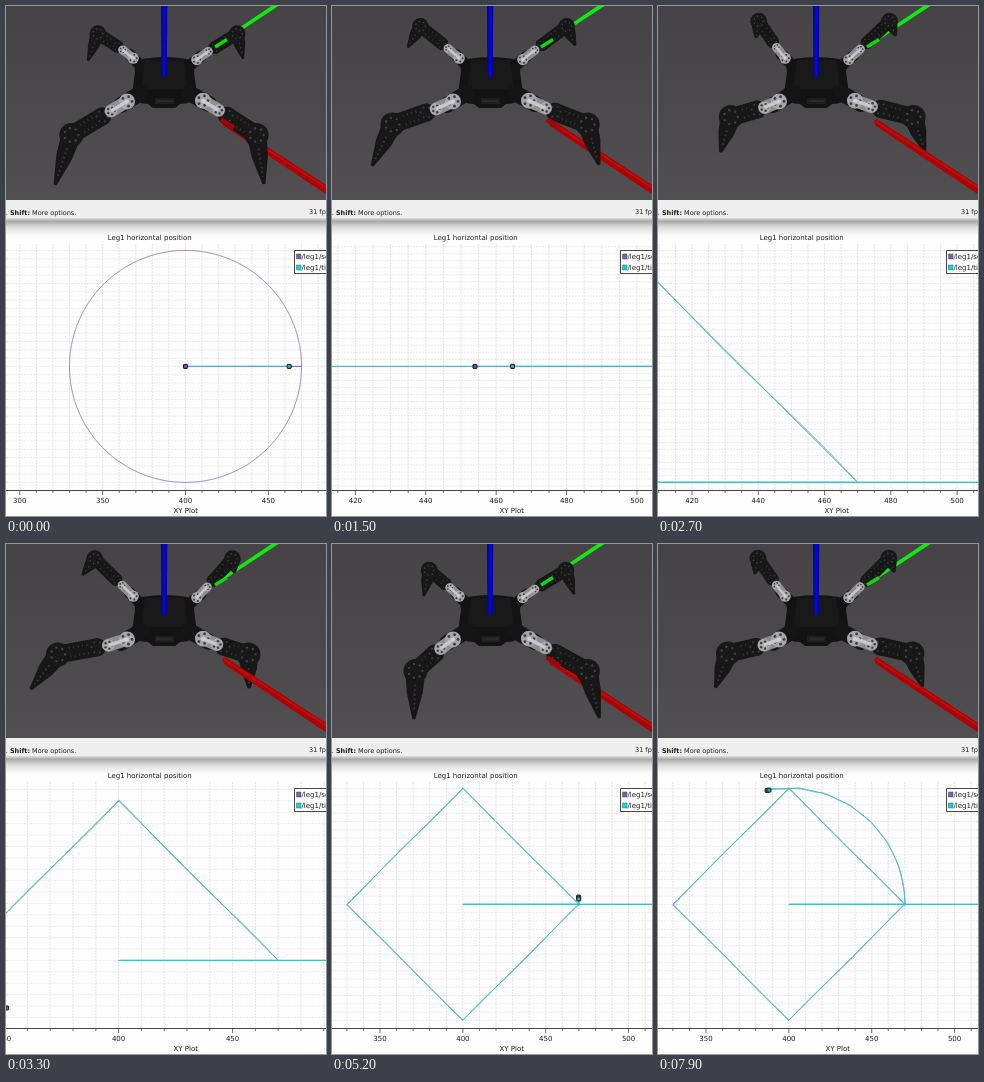
Recreate the animation shown at these times as an HTML page. Size 320 by 510 pixels, loop 8 s.

```html
<!DOCTYPE html>
<html lang="en">
<head>
<meta charset="utf-8">
<title>Leg position plot</title>
<style>
html, body { margin: 0; width: 100%; height: 100%; overflow: hidden; background: #fff; }
svg { display: block; width: 320px; height: 510px; }
text { font: 7px "DejaVu Sans", sans-serif; fill: #1c1c1c; }
.status { font-size: 6.5px; }
.mid { text-anchor: middle; }
</style>
</head>
<body>
<svg viewBox="0 0 320 510">
  <defs>
    <linearGradient id="sky" x2="0" y2="1">
      <stop stop-color="#454345"/><stop offset="1" stop-color="#514f51"/>
    </linearGradient>
    <linearGradient id="edge" x2="0" y2="1">
      <stop stop-color="#e0e0e0"/><stop offset=".18" stop-color="#a8a8a8"/>
      <stop offset=".5" stop-color="#dcdcdc"/><stop offset="1" stop-color="#fdfdfd"/>
    </linearGradient>
    <linearGradient id="rod" x2="1" y2="0">
      <stop stop-color="#0000a0"/><stop offset=".5" stop-color="#0a0ac4"/><stop offset="1" stop-color="#0000a8"/>
    </linearGradient>
    <clipPath id="view"><path d="M0 0H320V194H0Z"/></clipPath>
    <clipPath id="canvas"><path d="M0 238H320V484H0Z"/></clipPath>
  </defs>
  <path d="M0 0H320V510H0Z" fill="#fdfdfd"/>
  <path d="M0 0H320V194H0Z" fill="url(#sky)"/>
  <g id="robot" clip-path="url(#view)"></g>
  <path d="M0 194H320V213H0Z" fill="#eeeeee"/>
  <path d="M0 212H320V230H0Z" fill="url(#edge)"/>
  <text class="status" x="-.2" y="208.5" xml:space="preserve">. <tspan font-weight="bold">Shift:</tspan> More options.</text>
  <text class="status" x="303" y="207.5">31 fps</text>
  <text class="mid" x="143.7" y="233.5">Leg1 horizontal position</text>
  <g id="plot"></g>
  <path d="M288.5 244.5H325V267.5H288.5Z" fill="#fff" stroke="#333" stroke-width=".9"/>
  <path d="M290.5 248H295V253H290.5Z" fill="#7d5fa8" stroke="#444" stroke-width=".5"/>
  <path d="M290.5 259H295V264H290.5Z" fill="#20ced6" stroke="#267" stroke-width=".5"/>
  <text x="295.5" y="253.3">/leg1/setpoint</text>
  <text x="295.5" y="264.2">/leg1/tip</text>
</svg>
<script>
const LOOP = 8, FRAME = 0.1, CLEAR = 0.4, CIRCLE = 5.1;
const PURPLE = '#7350a8', CYAN = '#1fd0d6';
const robot = document.getElementById('robot');
const plot = document.getElementById('plot');

const lerp = (a, b, k) => a + (b - a) * k;
const mix = (p, q, k) => p.map((v, i) => lerp(v, q[i], k));
const clamp = v => Math.min(1, Math.max(0, v));
const fix = v => v.toFixed(2);
const polar = (r, turn) => [r * Math.cos(turn * 2 * Math.PI), r * Math.sin(turn * 2 * Math.PI)];

// Setpoint: circle, sweep out and back, diamond, circle (10 s per turn).
const onCircle = turn => { const [x, y] = polar(70, turn); return [400 + x, y]; };

function onSweep(t) {
  if (t < 0) return [lerp(470, 400, clamp((t + 0.1) / 0.094)), 0];
  if (t < 0.87) return [lerp(400, 528.7, clamp((t - CLEAR) / 0.47)), 0];
  if (t < 1.955) return [lerp(528.7, 400, (t - 0.87) / 1.085), 0];
  return [lerp(400, 470, clamp((t - 1.955) / 0.165)), 0];
}

// The setpoint rests briefly at the first corner.
function onDiamond(t) {
  const sides = t < 2.69 ? clamp((t - 2.14) / 0.46) : Math.min(4, 1 + (t - 2.69) / 0.47);
  const from = Math.floor(sides);
  const [x, y] = mix(polar(70, from / 4), polar(70, (from + 1) / 4), sides - from);
  return [400 + x, y];
}

function setpoint(t) {
  if (t < -0.1) return onCircle((t + 0.1) / 10);
  if (t < 2.14) return onSweep(t);
  return t < CIRCLE ? onDiamond(t) : onCircle((t - CIRCLE) / 10);
}
const tip = t => setpoint(t - (t > CIRCLE ? 0.025 : 0.09));

function trace(fn, from, to) {
  const points = [[400, 0]];
  for (let t = from; t < to; t += 0.01) points.push(fn(t));
  points.push(fn(to));
  return points;
}

function wobblyTip(t) {
  const [x, y] = tip(t);
  return y ? [x, y + 0.45 * Math.sin(t * 17)] : [x, y];
}

function tickSteps(scale) {
  if (scale < 2.5) return [50, 10, 5];
  return scale < 5 ? [20, 5, 2] : [10, 2, 1];
}

function drawPlot(t) {
  const fresh = t >= CLEAR;
  const wanted = trace(setpoint, fresh ? CLEAR : -10.1, t);
  const actual = trace(wobblyTip, fresh ? CLEAR : 0, t);
  const xs = wanted.map(p => p[0]), ys = wanted.map(p => p[1]);
  const left = Math.min(...xs), right = Math.max(...xs);
  const low = Math.min(...ys), high = Math.max(...ys);
  const scale = Math.min(453 / Math.max(right - left, 70), 232 / Math.max(high - low, 1));
  const midX = scale > 2.5 && high > 40 ? 178.5 : 179.5;
  const px = x => midX + (x - (left + right) / 2) * scale;
  const py = y => 360.4 - (y - (low + high) / 2) * scale;

  const [major, minor, rowStep] = tickSteps(scale);
  let cols = '', rows = '', ticks = '', labels = '';
  const firstX = Math.ceil(((left + right) / 2 - 190 / scale) / minor) * minor;
  for (let x = firstX; px(x) < 340; x += minor) {
    const at = fix(px(x)), big = x % major === 0;
    cols += `M${at} 238V484`;
    ticks += `M${at} 484v${big ? 5 : 3}`;
    if (big) labels += `<text class="mid" x="${at}" y="496.6">${x}</text>`;
  }
  const firstY = Math.ceil(((low + high) / 2 - 125 / scale) / rowStep) * rowStep;
  for (let y = firstY; py(y) > 238; y += rowStep) rows += `M0 ${fix(py(y))}H320`;

  const line = (points, color, width) =>
    `<path d="M${points.map(p => fix(px(p[0])) + ' ' + fix(py(p[1]))).join('L')}" fill="none" stroke="${color}" stroke-width="${width}"/>`;
  const marker = ([x, y], color) =>
    `<rect x="${fix(px(x) - 2)}" y="${fix(py(y) - 2)}" width="4" height="4" rx=".6" fill="${color}" stroke="#111"/>`;

  plot.innerHTML = `
    <g clip-path="url(#canvas)">
      <path d="${cols}" stroke="#d6d6d6" stroke-width=".6" stroke-dasharray="2 1"/>
      <path d="${rows}" stroke="#dedede" stroke-width=".6" stroke-dasharray="2 1"/>
      ${line(wanted, PURPLE, 0.7)}${line(actual, CYAN, 0.9)}
      ${marker(setpoint(t), PURPLE)}${marker(tip(t), '#3aa99c')}
    </g>
    <path d="M0 484.5H320" stroke="#333" stroke-width=".9"/>
    <path d="${ticks}" stroke="#444" stroke-width=".8"/>
    ${labels}<text class="mid" x="${midX + 0.2}" y="506.8">XY Plot</text>`;
}

// Home joints on screen; sway is the sideways foot travel per plot unit of x and y.
const legs = [
  { side: -1, size: 0.7, hip: [137, 62], bracket: [123, 48], knee: [93, 20], foot: [84, 41], sway: [0.1, 0.2] },
  { side: 1, size: 0.7, hip: [181, 62], bracket: [195, 50], knee: [230, 20], foot: [235, 39], sway: [0.1, 0.04] },
  { side: -1, size: 1, hip: [135, 87], bracket: [115, 99], knee: [67, 118], foot: [52, 159], sway: [0.42, 0.15] },
  { side: 1, size: 1, hip: [183, 87], bracket: [203, 98], knee: [249, 118], foot: [255, 158], sway: [0.17, 0.17] }
];

// All legs move outward together during the sweep, then follow the tip in the plane.
function poseLeg({ side, size, knee, foot, sway }, t) {
  const reach = clamp((t - CLEAR) / 0.55);
  const [x, y] = t < 2.1 ? [470, 0] : tip(t);
  const out = [side * lerp(3, 12, reach) * size, lerp(20, 1, reach) * size];
  const follow = [sway[0] * (x - 400) + sway[1] * y, (0.24 * (x - 400) - 0.18 * y) * size];
  const move = mix(out, follow, clamp((t - 1.6) / 0.6));
  const shifted = (p, k) => [p[0] + move[0] * k, p[1] + move[1] * k];
  return { knee: shifted(knee, 0.55), foot: shifted(foot, 1) };
}

const disc = ([x, y], r, fill) => `<circle cx="${fix(x)}" cy="${fix(y)}" r="${fix(r)}" fill="${fill}"/>`;
const bar = (a, b, width, color, extra = '') =>
  `<path d="M${a.map(fix)}L${b.map(fix)}" stroke="${color}" stroke-width="${fix(width)}" ${extra}/>`;
const shape = (points, fill) => `<path d="M${points.map(p => p.map(fix)).join('L')}Z" fill="${fill}"/>`;
const ring = ([x, y], r, n, dot, fill) => Array.from({ length: n }, (_, i) => {
  const [dx, dy] = polar(r, i / n);
  return disc([x + dx, y + dy], dot, fill);
}).join('');

function drawBracket(hip, bracket, knee, size) {
  const inner = mix(bracket, hip, 0.3), outer = mix(bracket, knee, 0.2);
  return bar(inner, outer, 13 * size, '#8d8d93', 'stroke-linecap="round"')
    + disc(inner, 8 * size, '#a6a6ad') + ring(inner, 5 * size, 5, 1.4 * size, '#3c3c40')
    + disc(outer, 6 * size, '#a9a9b0') + ring(outer, 3.5 * size, 5, 1.2 * size, '#3c3c40')
    + bar(inner, outer, 3.5 * size, '#c8c8ce') + disc(inner, 2 * size, '#d0d0d6');
}

function drawLeg(leg, t) {
  const { hip, bracket, size } = leg, { knee, foot } = poseLeg(leg, t);
  const length = Math.hypot(foot[0] - knee[0], foot[1] - knee[1]) || 1;
  const normal = [(knee[1] - foot[1]) / length, (foot[0] - knee[0]) / length];
  const beside = (p, d) => p.map((v, i) => v + normal[i] * d * size);
  const elbow = mix(bracket, knee, 0.38), shin = mix(knee, foot, 0.45);
  return bar(hip, bracket, 16 * size, '#151515', 'stroke-linecap="round"')
    + shape([beside(knee, 10), beside(shin, 8), beside(foot, 1.5), beside(foot, -1.5), beside(shin, -8), beside(knee, -10)], '#171717')
    + bar(knee, mix(knee, foot, 0.85), 2 * size, '#3c3b3c', 'stroke-dasharray="1.6 3"')
    + bar(elbow, knee, 18 * size, '#171717', 'stroke-linecap="round"')
    + bar(elbow, knee, 11 * size, '#3a393a', 'stroke-dasharray="1 3.5"')
    + bar(elbow, knee, 6 * size, '#171717')
    + disc(elbow, 9 * size, '#181818') + ring(elbow, 5.5 * size, 6, size, '#414041')
    + disc(knee, 12 * size, '#181818') + ring(knee, 7 * size, 7, 1.2 * size, '#434243')
    + drawBracket(hip, bracket, knee, size);
}

const body = '<path d="M136 53Q158 49 181 53Q190 57 188 66L191 88Q187 98 174 98L169 102H147L142 98Q129 98 126 88L129 66Q127 57 136 53Z" fill="#131313"/>'
  + shape([[139, 54], [178, 54], [182, 83], [135, 83]], '#191919')
  + bar([149, 95], [168, 95], 6, '#1f1f1f') + bar([151, 95], [166, 95], 2, '#2a2a2a');
const blueAxis = '<path d="M155 0H161.3L160.8 70Q158 72 155.4 70Z" fill="url(#rod)"/>';
const greenAxis = shape([[267, -1], [274, -1], [207, 43], [206, 40]], '#10ea10');
const greenStub = bar([209, 41], [221, 33.5], 3.4, '#10d810');
const redAxis = shape([[216, 115], [219, 113], [324, 181.5], [324, 191], [218, 120]], '#aa0404')
  + bar([218, 115.5], [324, 184], 1.8, '#c40c0c');
const redStub = bar([215, 113.5], [228, 122], 4.5, '#a00404');

function drawRobot(t) {
  const [rearLeft, rearRight, frontLeft, frontRight] = legs.map(leg => drawLeg(leg, t));
  const lifted = poseLeg(legs[3], t).foot[1] < 158;
  const right = lifted ? frontRight + redAxis : redAxis + frontRight + redStub;
  robot.innerHTML = greenAxis + rearLeft + rearRight + greenStub + body + blueAxis + frontLeft + right;
}

function render(now) {
  const t = Math.floor(now / 1000 % LOOP / FRAME + 1e-6) * FRAME;
  drawRobot(t);
  drawPlot(t);
}

const start = performance.now();
function tick() {
  render(performance.now() - start);
  requestAnimationFrame(tick);
}
tick();
</script>
</body>
</html>
```
